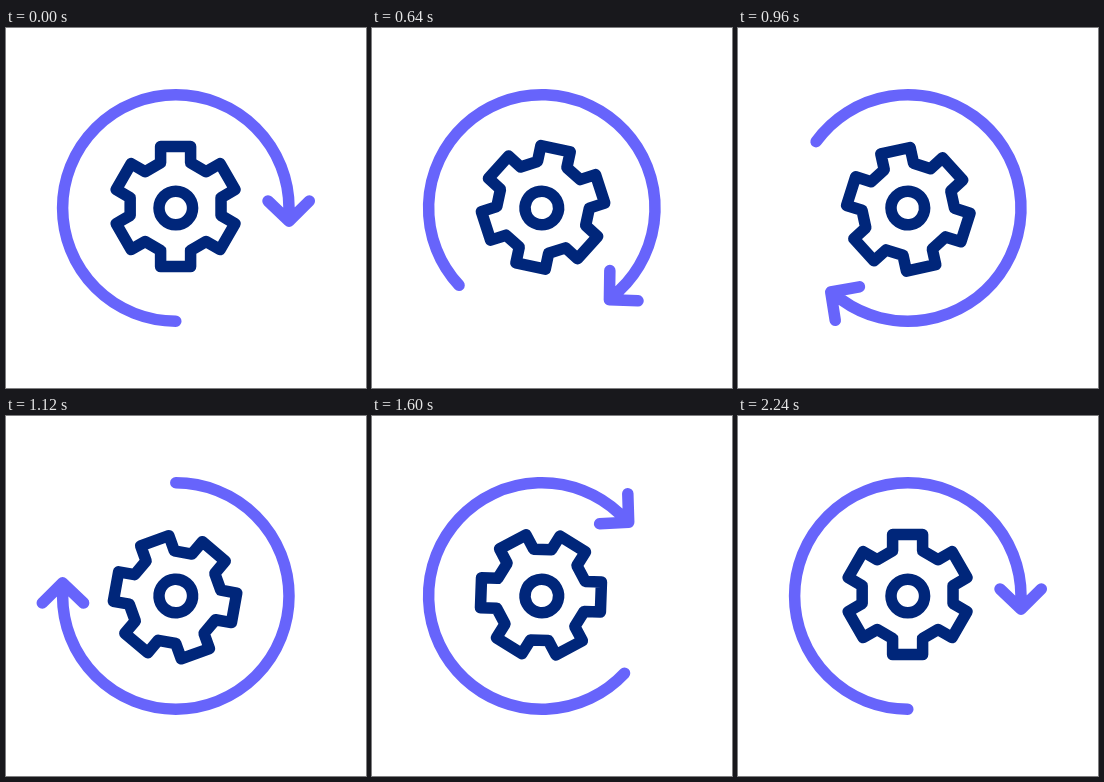
These frames come from a looping animation (360x360 px, 2.28 s). An HTML page:

```html
<!DOCTYPE html>
<html>
<head>
<meta charset="utf-8">
<style>
html, body { margin: 0; width: 100%; height: 100%; overflow: hidden; background: #fff; }
svg { display: block; width: 100vw; height: 100vh; }
g { fill: none; stroke-width: 11.5; stroke-linecap: round; stroke-linejoin: round; }
</style>
</head>
<body>
<svg viewBox="0 0 360 360">
  <g id="arrow" stroke="#6764fb">
    <path d="M0 113.2A113.2 113.2 0 1 1 113.2 0V13M92.2 -7L113.2 13.2L133.5 -7"/>
  </g>
  <g id="gear" stroke="#00267a">
    <path id="teeth" transform="translate(-.2 -1.4)"/>
    <circle r="16.8"/>
  </g>
</svg>
<script>
const LOOP = 2280, STEP = 40;
const $ = id => document.getElementById(id);

// Six identical teeth; the ring sits slightly off the hub.
const tooth = [[-15, -43.8], [-15, -60], [15, -60], [15, -43.8]];
const points = [];
for (let i = 0; i < 6; i++) {
  const c = Math.cos(i * Math.PI / 3), s = Math.sin(i * Math.PI / 3);
  for (const [x, y] of tooth) points.push([x * c - y * s, x * s + y * c]);
}
$('teeth').setAttribute('d', 'M' + points.join('L') + 'Z');

// Bezier easing with flat ends: control points (a, 0) and (b, 1).
function ease(x, a, b) {
  if (x >= 1) return 1;
  let lo = 0, hi = 1;
  for (let i = 0; i < 30; i++) {
    const s = (lo + hi) / 2, r = 1 - s;
    if (3 * a * s * r * r + 3 * b * s * s * r + s ** 3 < x) lo = s; else hi = s;
  }
  return lo * lo * (3 - 2 * lo);
}

function turn(id, progress) {
  $(id).setAttribute('transform', `translate(169.8 180) rotate(${360 * progress})`);
}

const start = performance.now();
function draw() {
  const elapsed = (performance.now() - start) % LOOP;
  const t = Math.floor(elapsed / STEP) * STEP;
  turn('arrow', ease(t / 2240, 0.54, 0.46));
  turn('gear', ease(t / 2040, 0.455, 0.515));
  requestAnimationFrame(draw);
}
draw();
</script>
</body>
</html>
```
